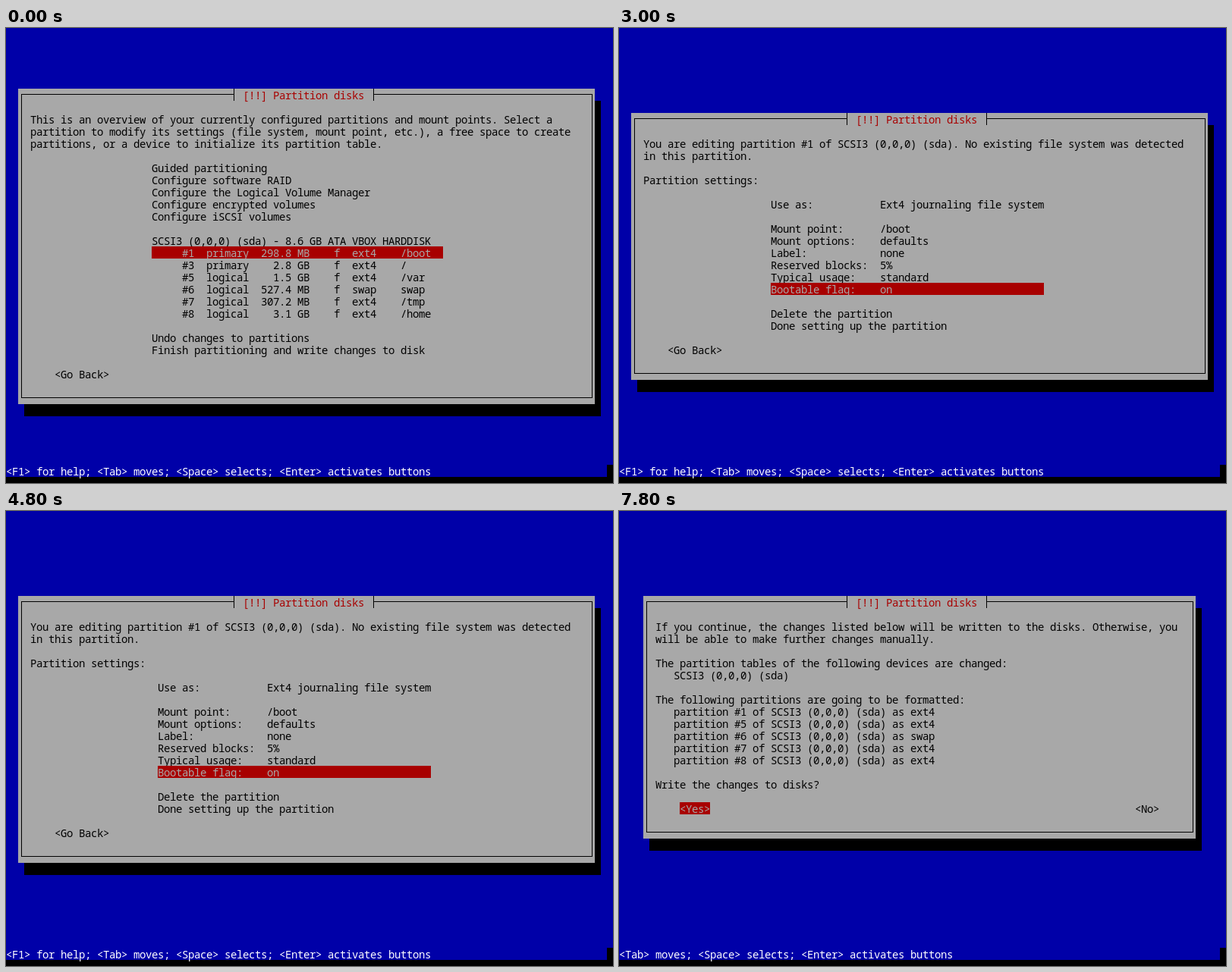
Write an HTML page with a canvas that moves like this. It is 800x600 px and loops after 9 s.

```html
<!DOCTYPE html>
<html lang="en">
<head>
<meta charset="utf-8">
<title>Partition disks</title>
<style>
  html, body { margin: 0; height: 100%; overflow: hidden; background: #0000a8; }
  canvas { display: block; }
</style>
</head>
<body>
<canvas id="stage" width="800" height="600"></canvas>
<script>
const CELL_W = 8, CELL_H = 16, BASELINE = 14, SCREEN_MS = 3000;
const BLUE = '#0000a8', GRAY = '#a8a8a8', RED = '#a80000', BLACK = '#000', WHITE = '#fff';
const KEYS = '<Tab> moves; <Space> selects; <Enter> activates buttons';

// Positions and sizes are in character cells; text blocks are [col, row, text].
const screens = [
  {
    box: [2, 5, 95, 26],
    help: '<F1> for help; ' + KEYS,
    blocks: [
      [4, 7, `This is an overview of your currently configured partitions and mount points. Select a
partition to modify its settings (file system, mount point, etc.), a free space to create
partitions, or a device to initialize its partition table.`],
      [24, 11, `Guided partitioning
Configure software RAID
Configure the Logical Volume Manager
Configure encrypted volumes
Configure iSCSI volumes

SCSI3 (0,0,0) (sda) - 8.6 GB ATA VBOX HARDDISK

     #3  primary    2.8 GB    f  ext4    /
     #5  logical    1.5 GB    f  ext4    /var
     #6  logical  527.4 MB    f  swap    swap
     #7  logical  307.2 MB    f  ext4    /tmp
     #8  logical    3.1 GB    f  ext4    /home

Undo changes to partitions
Finish partitioning and write changes to disk`],
      [8, 28, '<Go Back>'],
    ],
    selected: [24, 18, 48, '     #1  primary  298.8 MB    f  ext4    /boot'],
  },
  {
    box: [2, 7, 95, 22],
    help: '<F1> for help; ' + KEYS,
    blocks: [
      [4, 9, `You are editing partition #1 of SCSI3 (0,0,0) (sda). No existing file system was detected
in this partition.

Partition settings:`],
      [25, 14, `Use as:           Ext4 journaling file system

Mount point:      /boot
Mount options:    defaults
Label:            none
Reserved blocks:  5%
Typical usage:    standard


Delete the partition
Done setting up the partition`],
      [8, 26, '<Go Back>'],
    ],
    selected: [25, 21, 45, 'Bootable flag:    on'],
  },
  {
    box: [4, 7, 91, 20],
    help: KEYS,
    blocks: [
      [6, 9, `If you continue, the changes listed below will be written to the disks. Otherwise, you
will be able to make further changes manually.

The partition tables of the following devices are changed:
   SCSI3 (0,0,0) (sda)

The following partitions are going to be formatted:
   partition #1 of SCSI3 (0,0,0) (sda) as ext4
   partition #5 of SCSI3 (0,0,0) (sda) as ext4
   partition #6 of SCSI3 (0,0,0) (sda) as swap
   partition #7 of SCSI3 (0,0,0) (sda) as ext4
   partition #8 of SCSI3 (0,0,0) (sda) as ext4

Write the changes to disks?`],
      [85, 24, '<No>'],
    ],
    selected: [10, 24, 5, '<Yes>'],
  },
];

const ctx = document.getElementById('stage').getContext('2d');
ctx.font = '300 14px "Noto Sans Mono", "DejaVu Sans Mono", monospace';
ctx.letterSpacing = CELL_W - ctx.measureText('M').width + 'px';

function rect(x, y, w, h, color) {
  ctx.fillStyle = color;
  ctx.fillRect(x, y, w, h);
}

function cells(col, row, cols, rows, color) {
  rect(col * CELL_W, row * CELL_H, cols * CELL_W, rows * CELL_H, color);
}

function print(col, row, text, color = BLACK) {
  ctx.fillStyle = color;
  text.split('\n').forEach((line, i) =>
    ctx.fillText(line, col * CELL_W, (row + i) * CELL_H + BASELINE));
}

function drawDialog(col, row, cols, rows) {
  cells(col + 1, row + 1, cols, rows, BLACK);
  cells(col, row, cols, rows, GRAY);

  const left = col * CELL_W + 4, top = row * CELL_H + 7;
  const width = (cols - 1) * CELL_W, height = (rows - 1) * CELL_H;
  ctx.strokeStyle = BLACK;
  ctx.lineWidth = 1;
  ctx.strokeRect(left + 0.5, top + 0.5, width, height);

  cells(37.5, row, 23, 1, GRAY);
  for (const x of [300, 484]) rect(x, row * CELL_H, 1, CELL_H, BLACK);
  print(39, row, '[!!] Partition disks', RED);
}

function drawScreen({ box, help, blocks, selected: [col, row, width, label] }) {
  rect(0, 0, 800, 600, BLUE);
  rect(0, 592, 800, 8, BLACK);
  cells(99, 36, 1, 1, BLACK);
  print(0, 36, help, WHITE);
  drawDialog(...box);
  for (const block of blocks) print(...block);
  cells(col, row, width, 1, RED);
  print(col, row, label, GRAY);
}

const start = performance.now();
let shown = -1;

function tick() {
  const index = Math.floor((performance.now() - start) / SCREEN_MS) % screens.length;
  if (index !== shown) drawScreen(screens[shown = index]);
  requestAnimationFrame(tick);
}
tick();
</script>
</body>
</html>
```
